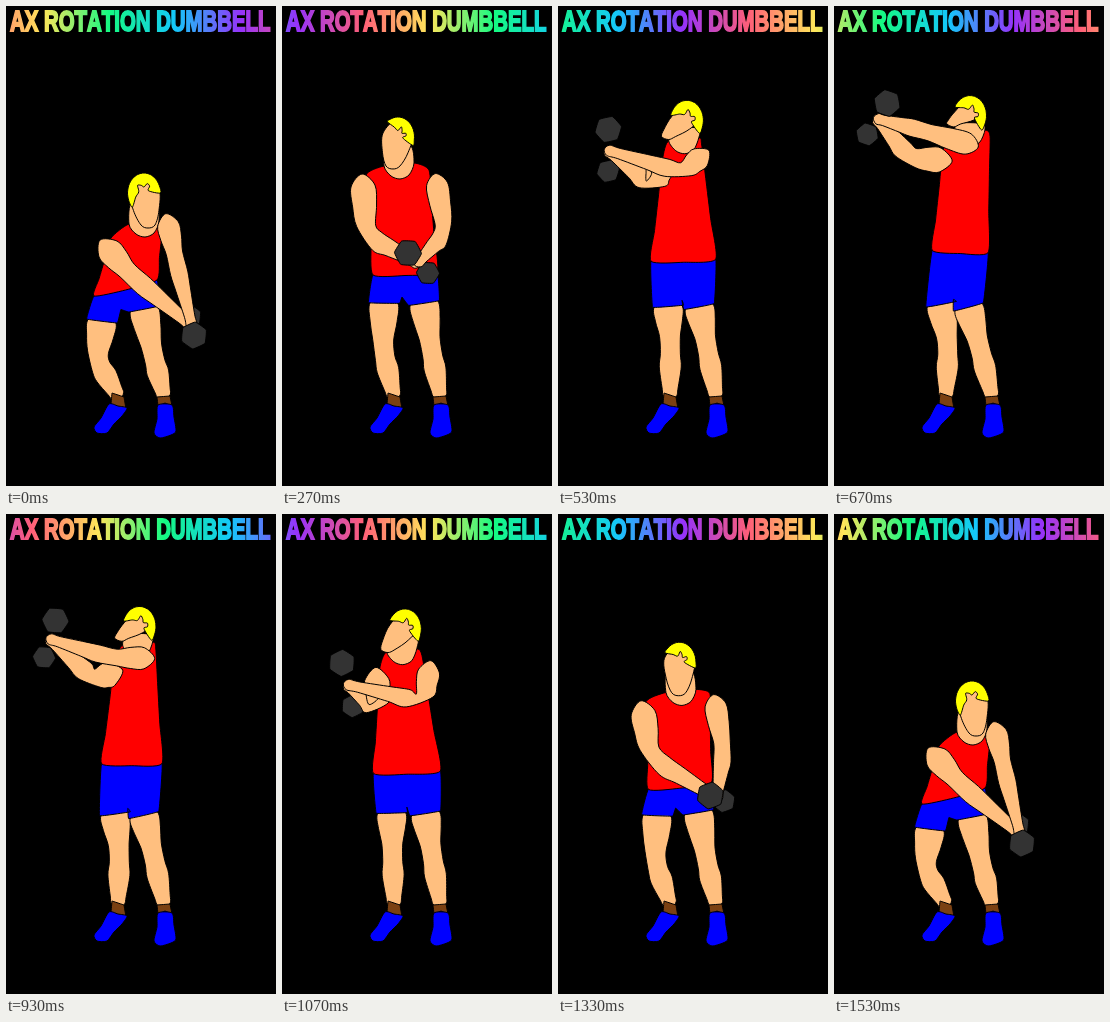
These frames come from a looping animation (270 px wide and 480 px high, 1590 ms). An HTML page:

```html
<!DOCTYPE html>
<html lang="en">
<head>
<meta charset="utf-8">
<title>Ax rotation dumbbell</title>
<style>
  html, body { margin: 0; width: 100%; height: 100%; overflow: hidden; background: #000; }
  svg { display: block; width: 100vw; height: 100vh; }
  text { font: bold 30px "Liberation Sans", Arial, sans-serif; font-kerning: none; }
  path { stroke: #000; stroke-width: 1; stroke-linejoin: round; }
</style>
</head>
<body>
<svg viewBox="0 0 270 480">
  <defs>
    <linearGradient id="rainbow" gradientUnits="userSpaceOnUse" spreadMethod="repeat">
      <stop offset="0" stop-color="#ff5f78"/>
      <stop offset=".2" stop-color="#ffe65a"/>
      <stop offset=".4" stop-color="#14fa82"/>
      <stop offset=".6" stop-color="#14c8fa"/>
      <stop offset=".8" stop-color="#9632fa"/>
      <stop offset="1" stop-color="#ff5f78"/>
    </linearGradient>
  </defs>
  <text transform="translate(4 25.4) scale(.68 1)" fill="url(#rainbow)" stroke="url(#rainbow)" stroke-width="2">AX ROTATION DUMBBELL</text>
  <g id="man"></g>
</svg>
<script>
const NS = 'http://www.w3.org/2000/svg';
const LOOP = 1590, SWING = 1530, FRAMES = 24;
const SKIN = '#ffbf7f', RED = '#f00', BLUE = '#00f', YELLOW = '#ff0', BROWN = '#7a4012', IRON = '#333';

// Joints in four poses: bent, rising, chest, raised; LIFT places them along the lift
const LIFT = [0, .277, .536, .93];
const RIG = {
  head:   '138,187 116,131 118,116 135,111',
  chin:   '142,222 111,163 104,143 118,124',
  hair:   '135,360 230,385 220,395 200,405', // angles where the hairline starts and ends
  neck:   '139,231 118,173 117,154 135,142',
  back:   '158,210 147,164 140,146 153,132',
  waistL: '88,290 91,269 91,262 97,247',
  waistR: '151,274 155,266 158,260 155,248',
  armL:   '102,243 81,180 88,166 106,157',
  elbowL: '126,270 85,230 92,207 82,158',
  armR:   '162,218 155,178 150,162 136,141',
  elbowR: '170,254 163,227 152,203 95,133',
  grip:   '186,320 136,257 85,197 43,118',
  bell:   '2,9.5 -10,-10 -9,-20 8,-17',
  hipL:   '96,315 102,297 108,297 108,299',
  kneeL:  '91,354 101,343 108,338 114,338',
  hipR:   '138,303 142,297 144,298 136,301',
  kneeR:  '147,348 149,341 150,338 146,339'
};
const ANKLE_L = [112, 390], ANKLE_R = [158, 390];
const LEG = [[14, 13.5, 10.5], [10, 11, 8, 6.5]];
const ARM = [[12, 12, 9.5], [10, 8.5, 6, 6]];
const SLIM_ARM = ARM.map(row => row.map(w => w * .88));

const points = text => text.split(' ').map(p => p.split(',').map(Number));
const rig = Object.entries(RIG).map(([name, text]) => [name, points(text)]);

const add = (p, x, y) => [p[0] + x, p[1] + y];
const mix = (p, q, k) => [p[0] + (q[0] - p[0]) * k, p[1] + (q[1] - p[1]) * k];
const move = (p, d, k) => add(p, d[0] * k, d[1] * k);
const fmt = p => p.map(n => n.toFixed(2)).join(' ');

function dir(p, q) {
  const x = q[0] - p[0], y = q[1] - p[1], len = Math.hypot(x, y) || 1;
  return [x / len, y / len];
}
const normal = ([x, y]) => [y, -x];

// Cubic through the four poses
function pose(s) {
  const weights = LIFT.map((a, i) =>
    LIFT.reduce((w, b, j) => j === i ? w : w * (s - b) / (a - b), 1));
  const blend = (pts, axis) => pts.reduce((sum, p, i) => sum + p[axis] * weights[i], 0);
  return Object.fromEntries(rig.map(([name, pts]) => [name, [blend(pts, 0), blend(pts, 1)]]));
}

// Closed smooth outline; bend 0 gives straight edges
function outline(pts, bend) {
  const n = pts.length, at = i => pts[(i + n) % n];
  const lean = (p, q, r, k) => add(p, (r[0] - q[0]) * k, (r[1] - q[1]) * k);
  return 'M' + fmt(pts[0]) + pts.map((p, i) => {
    const q = at(i + 1);
    return 'C' + [lean(p, at(i - 1), q, bend), lean(q, p, at(i + 2), -bend), q].map(fmt).join(' ');
  }).join('') + 'Z';
}

// Two bones wrapped in half widths
function limb(a, b, c, [upper, lower]) {
  const left = [], right = [], d1 = dir(a, b), d2 = dir(b, c);
  const wrap = (p, q, d, steps, widths) => steps.forEach((t, i) => {
    const m = mix(p, q, t), n = normal(d);
    left.push(move(m, n, -widths[i]));
    right.unshift(move(m, n, widths[i]));
  });
  wrap(a, b, d1, [0, .4, .8], upper);
  wrap(b, c, d2, [.2, .45, .85, 1], lower);
  return outline([move(a, d1, -upper[0]), ...left, move(c, d2, 4), ...right], .16);
}

function shorts({ hipL, hipR, kneeL, kneeR, waistL, waistR }) {
  const hem = (hip, knee) => [-15.5, 15.5].map(w => move(hip, normal(dir(hip, knee)), w));
  const crotch = add(mix(hipL, hipR, .45), 0, -6);
  return outline([waistL, ...hem(hipL, kneeL), crotch, ...hem(hipR, kneeR), waistR], .02);
}

function torso({ neck, armL, back, waistL, waistR }) {
  const chest = add(armL, 3, -11);
  const side = (p, q) => [.35, .7].map(k => mix(p, q, k));
  return outline([
    add(neck, -16, -13), chest, ...side(chest, waistL), waistL,
    add(mix(waistL, waistR, .5), 0, 2), waistR, ...side(waistR, back), back, add(neck, 14, -16)
  ], .1);
}

const throat = ({ head, neck }) => outline([
  add(head, -12, 8), add(neck, -16, -13), add(neck, -9, -3), neck,
  add(neck, 9, -4), add(neck, 14, -16), add(head, 12, 8)
], .14);

function face({ head, chin }) {
  const left = add(head, -15, -4), right = add(head, 15, -4);
  return outline([
    left, add(mix(left, chin, .55), -6, 0), add(chin, -7, -3), chin,
    add(chin, 7, -3), add(mix(right, chin, .55), 6, 0), right, add(head, 0, -18)
  ], .16);
}

// Arc over the skull and a wavy hairline back
function hair({ head, hair: [from, to] }) {
  const N = 10, pts = [];
  const polar = (u, r) => {
    const a = (from + (to - from) * u) * Math.PI / 180;
    return add(head, 16.5 * r * Math.cos(a), 20 * r * Math.sin(a));
  };
  for (let i = 0; i <= N; i++) pts.push(polar(i / N, 1));
  for (let i = N - 1; i > 0; i--) pts.push(polar(i / N, .42 + .13 * Math.sin(i * 1.9)));
  return outline(pts, .14);
}

const weight = (p, axis, r) => outline(Array.from({ length: 6 }, (_, i) => {
  const a = Math.atan2(axis[1], axis[0]) + .3 + i * Math.PI / 3;
  return add(p, r * Math.cos(a), r * Math.sin(a));
}), .05);

const still = (text, bend) => {
  const d = outline(points(text), bend);
  return () => d;
};

// Back to front
const parts = [
  [SKIN, j => limb(j.hipL, j.kneeL, ANKLE_L, LEG)],
  [SKIN, j => limb(j.hipR, j.kneeR, ANKLE_R, LEG)],
  [BROWN, still('106,387 105,398 112,401 120,403 118,391', 0)],
  [BROWN, still('151,391 152,400 159,397 166,400 164,390', 0)],
  [BLUE, still('103,398 95,412 88,421 91,427 101,427 108,418 116,410 121,402 112,400', .12)],
  [BLUE, still('152,399 151,413 148,427 154,432 165,429 170,425 168,411 166,399', .12)],
  [BLUE, shorts], [RED, torso], [SKIN, throat], [SKIN, face], [YELLOW, hair],
  [IRON, j => weight(move(j.grip, j.bell, -1), j.bell, 11.5)],
  [SKIN, j => limb(j.armL, j.elbowL, j.grip, ARM)],
  [SKIN, j => limb(j.armR, j.elbowR, j.grip, SLIM_ARM)],
  [IRON, j => weight(move(j.grip, j.bell, 1), j.bell, 13.5)]
].map(([fill, shape]) => {
  const el = document.createElementNS(NS, 'path');
  el.setAttribute('fill', fill);
  document.getElementById('man').append(el);
  return { el, shape };
});

const rainbow = document.getElementById('rainbow');
const start = k => Math.round(k * 20 / 3) * 10;

function draw(time) {
  let k = FRAMES - 1;
  while (k > 0 && start(k) > time) k--;
  const joints = pose((1 - Math.cos(2 * Math.PI * start(k) / SWING)) / 2);
  for (const { el, shape } of parts) el.setAttribute('d', shape(joints));
  const width = 485, x = (k / 12 - .1) * width;
  rainbow.setAttribute('x1', x);
  rainbow.setAttribute('x2', x + width);
}

const begin = performance.now();
function tick() {
  draw((performance.now() - begin) % LOOP);
  requestAnimationFrame(tick);
}
tick();
</script>
</body>
</html>
```
